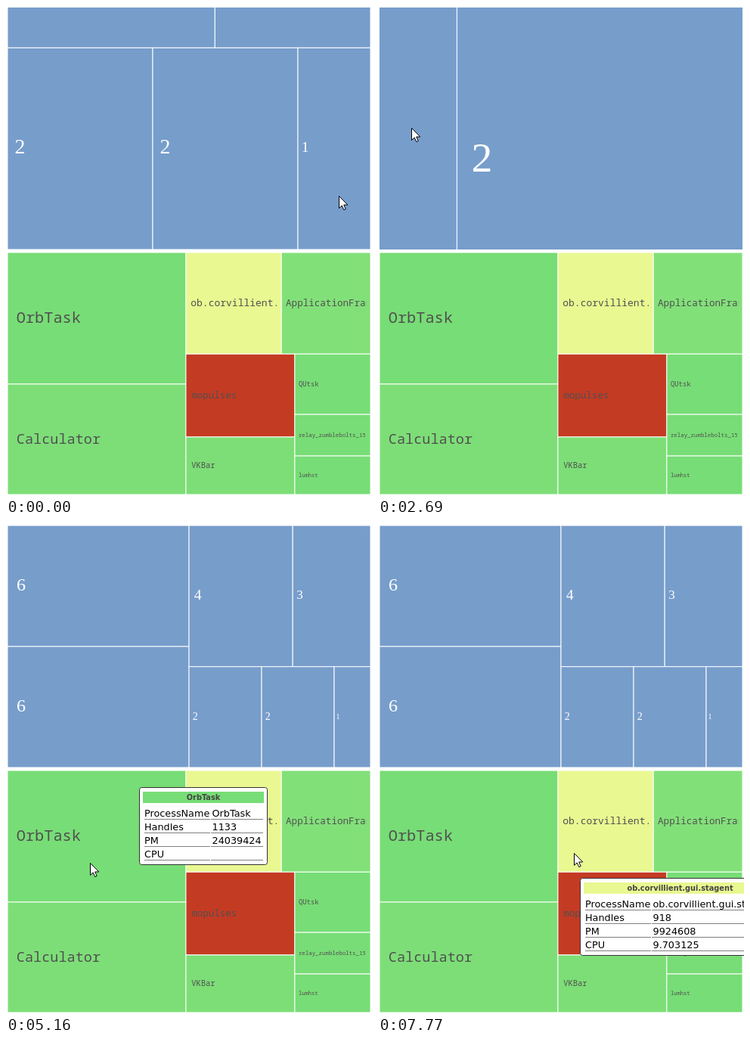
An HTML page with a canvas that plays this animation: 484x648 px, repeating every 8000 ms.

```html
<!DOCTYPE html>
<html lang="en">
<head>
<meta charset="utf-8">
<title>Treemaps</title>
<style>
html, body { margin: 0; width: 484px; height: 648px; overflow: hidden; background: #fff; }
canvas { display: block; }
</style>
</head>
<body>
<canvas id="stage" width="484" height="648"></canvas>
<script>
const ctx = document.getElementById('stage').getContext('2d');
const LOOP = 8000, WIDTH = 480, HEIGHT = 320, LEFT = 2;
const SANS = '"DejaVu Sans", Verdana, sans-serif';

const counts = [6, 6, 4, 3, 2, 2, 1].map(n => ({ label: n, value: n, fill: '#779dcb' }));

// Name, handles, memory, processor time
const processes = [
  ['OrbTask', 1133, 24039424, ''],
  ['Calculator', 587, 20170752, 0.53125],
  ['ob.corvillient.gui.stagent', 918, 9924608, 9.703125],
  ['ApplicationFrameHost', 402, 9261056, 0.9375],
  ['mopulses', 651, 9244672, 22.46875],
  ['VKBar', 318, 6410240, 0.5],
  ['QUtsk', 240, 4681728, ''],
  ['relay_zumblebolts_15', 196, 3219456, 0.125],
  ['lumhst', 154, 2985984, '']
].map(([label, handles, value, cpu]) =>
  ({ label, value, fill: heat(+cpu), facts: [label, handles, value, cpu] }));

// Green through yellow to red
function heat(cpu) {
  const stops = [[119, 221, 118], [233, 248, 145], [196, 59, 35]];
  const pos = cpu < 9.7 ? cpu / 9.7 : 1 + (cpu - 9.7) / 12.77;
  const i = Math.min(1, Math.floor(pos));
  return `rgb(${stops[i].map((c, k) => c + (stops[i + 1][k] - c) * (pos - i))})`;
}

const sum = items => items.reduce((s, item) => s + item.value, 0);

// Squarified layout: extend each row while its worst aspect ratio improves
function squarify(items) {
  let x = 0, y = 0, w = WIDTH, h = HEIGHT, rest = items;
  const scale = w * h / sum(items), cells = [];
  while (rest.length) {
    const side = Math.min(w, h);
    const thickness = n => sum(rest.slice(0, n)) * scale / side;
    const worst = n => Math.max(...rest.slice(0, n).map(item => {
      const ratio = thickness(n) ** 2 / (item.value * scale);
      return Math.max(ratio, 1 / ratio);
    }));
    let n = 1;
    while (n < rest.length && worst(n + 1) <= worst(n)) n++;
    const thick = thickness(n), wide = w < h;
    let along = 0;
    for (const item of rest.slice(0, n)) {
      const length = item.value * scale / thick;
      cells.push(wide
        ? { ...item, x: x + along, y, w: length, h: thick }
        : { ...item, x, y: y + along, w: thick, h: length });
      along += length;
    }
    if (wide) { y += thick; h -= thick; } else { x += thick; w -= thick; }
    rest = rest.slice(n);
  }
  return cells;
}

const upper = {
  top: 2, cells: squarify(counts),
  family: '"Liberation Serif", "Times New Roman", serif', em: 0.123, drop: 0.23, ink: '#fff'
};
const lower = {
  top: 326, cells: squarify(processes),
  family: '"Noto Sans Mono", "DejaVu Sans Mono", monospace', em: 0.1, drop: 0.3, ink: '#505050'
};

// Expands moves [start, end, steps, ...goal] into timed poses
function expand(start, moves) {
  const poses = [{ time: 0, at: start }];
  for (const [begin, end, steps, ...goal] of moves) {
    const from = poses.at(-1).at;
    for (let k = 1; k <= steps; k++) {
      const time = begin + (end - begin) * (k - 1) / Math.max(1, steps - 1);
      poses.push({ time, at: from.map((a, i) => a + (goal[i] - a) * k / steps) });
    }
  }
  return poses;
}

// Goal: zoom and origin
const views = expand([2, 240, 160], [
  [310, 310, 1, 4, 360, 208.8],
  [1270, 2090, 7, 4, 297, 204.2],
  [2240, 2810, 5, 4, 313.75, 201.9],
  [3660, 3660, 1, 1, 0, 0]
]);

// Goal: pointer position
const pointer = expand([440, 251], [
  [1120, 1120, 1, 374, 228],
  [1270, 2090, 7, 98, 154],
  [2240, 2810, 5, 31, 163],
  [3210, 3510, 3, 392, 173],
  [4500, 4900, 4, 167, 339],
  [5030, 5160, 2, 111, 448],
  [5310, 5460, 2, 90, 561],
  [5710, 5710, 1, 244, 538],
  [5830, 5830, 1, 260, 536],
  [5980, 6650, 6, 258, 443],
  [6790, 6910, 2, 258, 439],
  [7510, 7770, 3, 259, 435]
]);

// A tip stays where the pointer entered its cell
let last = {};
for (const pose of pointer) {
  const px = pose.at[0] - LEFT, py = pose.at[1] - lower.top;
  const cell = lower.cells.find(c => px >= c.x && px < c.x + c.w && py >= c.y && py < c.y + c.h);
  pose.cell = cell;
  pose.entry = cell === last.cell ? last.entry : pose.at;
  last = pose;
}

const current = (poses, t) => poses.findLast(pose => pose.time <= t);

function text(str, x, y, font, color, align = 'left') {
  ctx.font = font;
  ctx.fillStyle = color;
  ctx.textAlign = align;
  ctx.fillText(str, x, y);
}

function clipTo(x, y, w, h, draw) {
  ctx.save();
  ctx.beginPath();
  ctx.rect(x, y, w, h);
  ctx.clip();
  draw();
  ctx.restore();
}

function drawMap({ top, cells, family, em, drop, ink }, [zoom, u, v]) {
  ctx.strokeStyle = '#fff';
  ctx.lineWidth = 1;
  clipTo(LEFT, top, WIDTH, HEIGHT, () => {
    for (const cell of cells) {
      const x = LEFT + (cell.x - u) * zoom, y = top + (cell.y - v) * zoom;
      const w = cell.w * zoom, h = cell.h * zoom;
      const size = em * Math.sqrt(w * h);
      ctx.fillStyle = cell.fill;
      ctx.fillRect(x, y, w, h);
      ctx.strokeRect(x, y, w, h);
      clipTo(x, y, w * 0.95, h, () =>
        text(cell.label, x + w * 0.05, y + h / 2 + size * drop, `${size}px ${family}`, ink));
    }
  });
}

function drawTip({ cell, entry }) {
  if (!cell) return;
  const font = `12.8px ${SANS}`, height = 102;
  const x = Math.round(entry[0] + 10);
  const below = Math.round(entry[1] + 10);
  const y = below + height > 648 ? below - 20 - height : below;
  ctx.font = font;
  const width = Math.round(104 + Math.max(...cell.facts.map(s => ctx.measureText(s).width)));
  ctx.beginPath();
  ctx.roundRect(x - 0.5, y - 0.5, width, height, 3);
  ctx.fillStyle = '#fff';
  ctx.fill();
  ctx.strokeStyle = '#333';
  ctx.stroke();
  ctx.fillStyle = cell.fill;
  ctx.fillRect(x + 4, y + 5, width - 9, 15);
  text(cell.label, x + width / 2 - 0.5, y + 16, `bold 9.8px ${SANS}`, '#444', 'center');
  ['ProcessName', 'Handles', 'PM', 'CPU'].forEach((name, i) => {
    const base = y + 38 + i * 18;
    text(name, x + 6, base, font, '#000');
    text(cell.facts[i], x + 95.5, base, font, '#000');
    ctx.fillStyle = '#808080';
    ctx.fillRect(x + 6, base + 3, 87, 1);
    ctx.fillRect(x + 94, base + 3, width - 100, 1);
  });
}

const arrow = new Path2D('M.5 .5V16.5L4.2 13L6.8 18.6L9.2 17.5L6.7 12H11.8Z');

function drawPointer([x, y]) {
  ctx.save();
  ctx.translate(Math.round(x), Math.round(y));
  ctx.fillStyle = '#fff';
  ctx.strokeStyle = '#000';
  ctx.fill(arrow);
  ctx.stroke(arrow);
  ctx.restore();
}

function frame() {
  const t = performance.now() % LOOP;
  const pose = current(pointer, t);
  ctx.fillStyle = '#fff';
  ctx.fillRect(0, 0, 484, 648);
  drawMap(upper, current(views, t).at);
  drawMap(lower, [1, 0, 0]);
  drawTip(pose);
  drawPointer(pose.at);
  requestAnimationFrame(frame);
}
frame();
</script>
</body>
</html>
```
